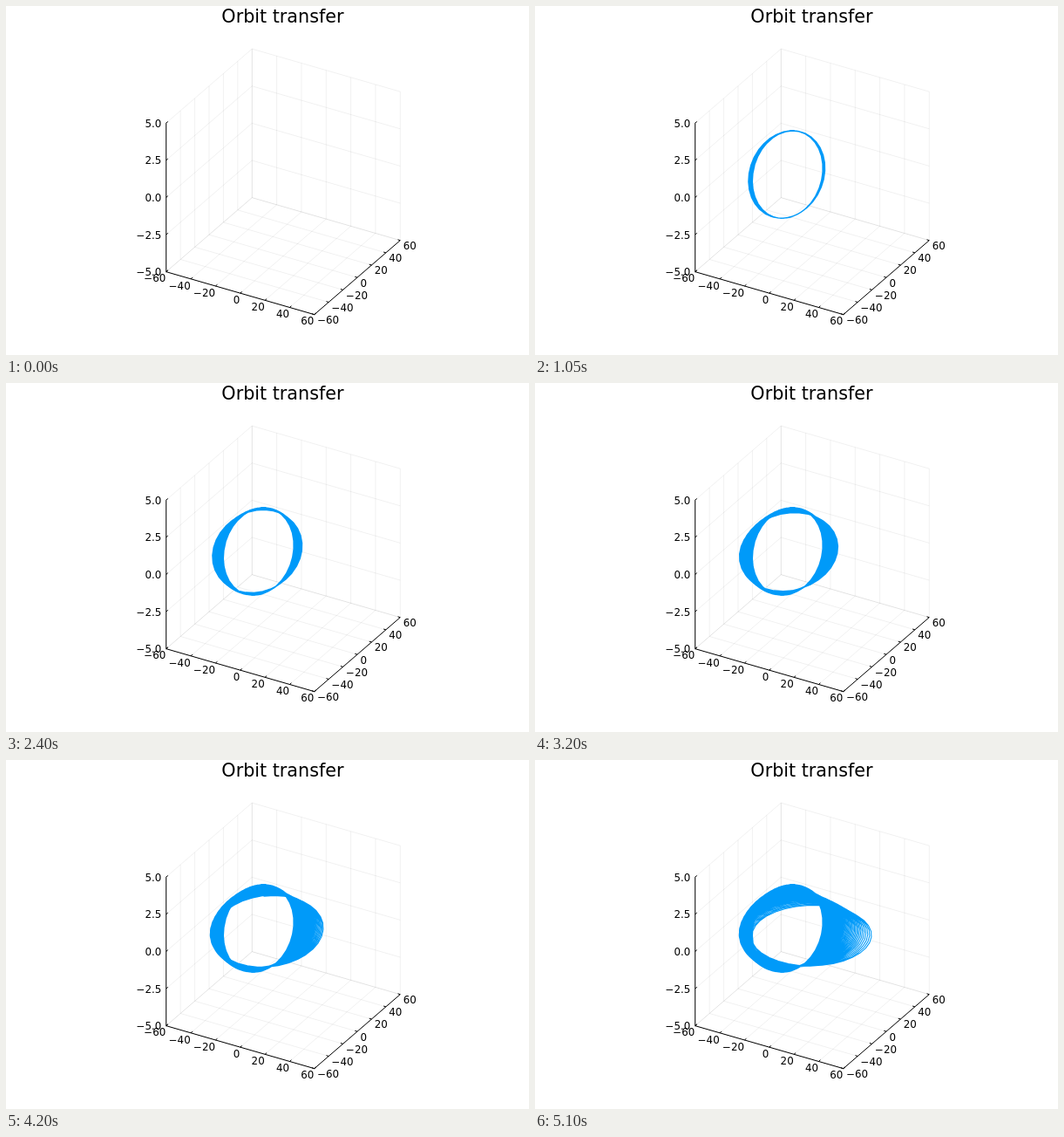
An HTML page with a canvas for the animation above (5.15 s loop, 600x400 px).

```html
<!DOCTYPE html>
<html lang="en">
<head>
<meta charset="utf-8">
<title>Orbit transfer</title>
<style>
  html, body { margin: 0; width: 100%; height: 100%; overflow: hidden; background: #fff; }
  canvas { display: block; width: 600px; height: 400px; }
</style>
</head>
<body>
<canvas id="stage" width="600" height="400"></canvas>
<script>
const ctx = document.getElementById('stage').getContext('2d');
const FONT = '"DejaVu Sans", sans-serif';
const STEP = 50, FRAMES = 103;
const MU = 5165.86;    // Mm^3 / h^2
const HOURS = 1699;    // duration of the whole transfer
const XY = [-60, -40, -20, 0, 20, 40, 60];
const Z = [-5, -2.5, 0, 2.5, 5];

const project = (x, y, z) => [
  318 + x * 1.4167 + y * 0.8208,
  201.4 + x * 0.4083 - y * 0.7083 - z * 17.05
];

// Slowly varying orbit elements over the normalised time
const knots = [0, 0.206, 0.47, 0.627, 0.735, 0.91, 1];
const semiMajor = [26.57, 28.9, 33.3, 36, 37.8, 40.6, 42.165];
const focusShift = [19.93, 20.6, 20.9, 18.9, 16, 7.3, 0];
const sinTilt = [0.1219, 0.1, 0.061, 0.0395, 0.0268, 0.009, 0];

function curve(v, t) {
  const last = knots.length - 1;
  let i = 0;
  while (i < last - 1 && t > knots[i + 1]) i++;
  const slope = k => {
    const p = Math.max(k - 1, 0), n = Math.min(k + 1, last);
    return (v[n] - v[p]) / (knots[n] - knots[p]);
  };
  const h = knots[i + 1] - knots[i], s = (t - knots[i]) / h;
  const s2 = s * s, s3 = s2 * s;
  return v[i] * (2 * s3 - 3 * s2 + 1) + v[i + 1] * (3 * s2 - 2 * s3)
    + h * (slope(i) * (s3 - 2 * s2 + s) + slope(i + 1) * (s3 - s2));
}

// Follow the eccentric anomaly from apogee until the transfer is over
function buildTrack() {
  const track = [], dE = 0.19;
  let t = 0;
  for (let E = Math.PI; t <= 1; E += dE) {
    const a = curve(semiMajor, t);
    const shift = curve(focusShift, t);
    const sin = curve(sinTilt, t);
    const side = Math.sqrt(a * a - shift * shift) * Math.sin(E);
    const pos = project(a * Math.cos(E) - shift, side * Math.sqrt(1 - sin * sin), side * sin);
    track.push({ t, pos });
    t += dE * (1 - shift / a * Math.cos(E)) * Math.sqrt(a * a * a / MU) / HOURS;
  }
  return track;
}

function line(from, to) {
  ctx.beginPath();
  ctx.moveTo(...from);
  ctx.lineTo(...to);
  ctx.stroke();
}

function label(text, x, y, align) {
  ctx.textAlign = align;
  ctx.fillText(text, x, y + 4.3);
}

const signed = (v, digits) => v.toFixed(digits).replace('-', '\u2212');

function drawGrid() {
  ctx.strokeStyle = 'rgba(0,0,0,0.1)';
  ctx.lineWidth = 0.6;
  for (const v of XY) {
    line(project(v, -60, -5), project(v, 60, -5));
    line(project(v, 60, -5), project(v, 60, 5));
    line(project(-60, v, -5), project(60, v, -5));
    line(project(-60, v, -5), project(-60, v, 5));
  }
  for (const z of Z) {
    line(project(-60, -60, z), project(-60, 60, z));
    line(project(-60, 60, z), project(60, 60, z));
  }
}

function drawAxes() {
  ctx.strokeStyle = ctx.fillStyle = '#000';
  ctx.lineWidth = 1;
  line(project(-60, -60, -5), project(60, -60, -5));
  line(project(60, -60, -5), project(60, 60, -5));
  line(project(-60, -60, -5), project(-60, -60, 5));
  ctx.font = '11.85px ' + FONT;
  for (const v of XY) {
    const [ax, ay] = project(v, -60, -5);
    line([ax, ay], [ax + 2, ay - 1.7]);
    label(signed(v, 0), ax - 0.4, ay + 7.5, 'right');
    const [bx, by] = project(60, v, -5);
    line([bx, by], [bx - 2.7, by - 0.8]);
    label(signed(v, 0), bx + 3.4, by + 6.2, 'left');
  }
  for (const z of Z) {
    const [x, y] = project(-60, -60, z);
    line([x, y], [x + 2, y - 1.7]);
    label(signed(z, 1), x - 5.5, y + 0.4, 'right');
  }
  ctx.font = '20.7px ' + FONT;
  ctx.textAlign = 'center';
  ctx.fillText('Orbit transfer', 317.4, 18.8);
}

const track = buildTrack();

function drawOrbit(t) {
  ctx.strokeStyle = '#009af9';
  ctx.lineWidth = 1.05;
  ctx.lineJoin = 'round';
  ctx.beginPath();
  for (const point of track) {
    if (point.t > t) break;
    ctx.lineTo(...point.pos);
  }
  ctx.stroke();
}

let shown = -1;
function render(now) {
  const frame = Math.floor(now / STEP) % FRAMES;
  if (frame !== shown) {
    shown = frame;
    ctx.fillStyle = '#fff';
    ctx.fillRect(0, 0, 600, 400);
    drawGrid();
    drawAxes();
    if (frame > 0) drawOrbit(frame / (FRAMES - 1));
  }
}

const start = performance.now();
function tick() {
  render(performance.now() - start);
  requestAnimationFrame(tick);
}
tick();
</script>
</body>
</html>
```
